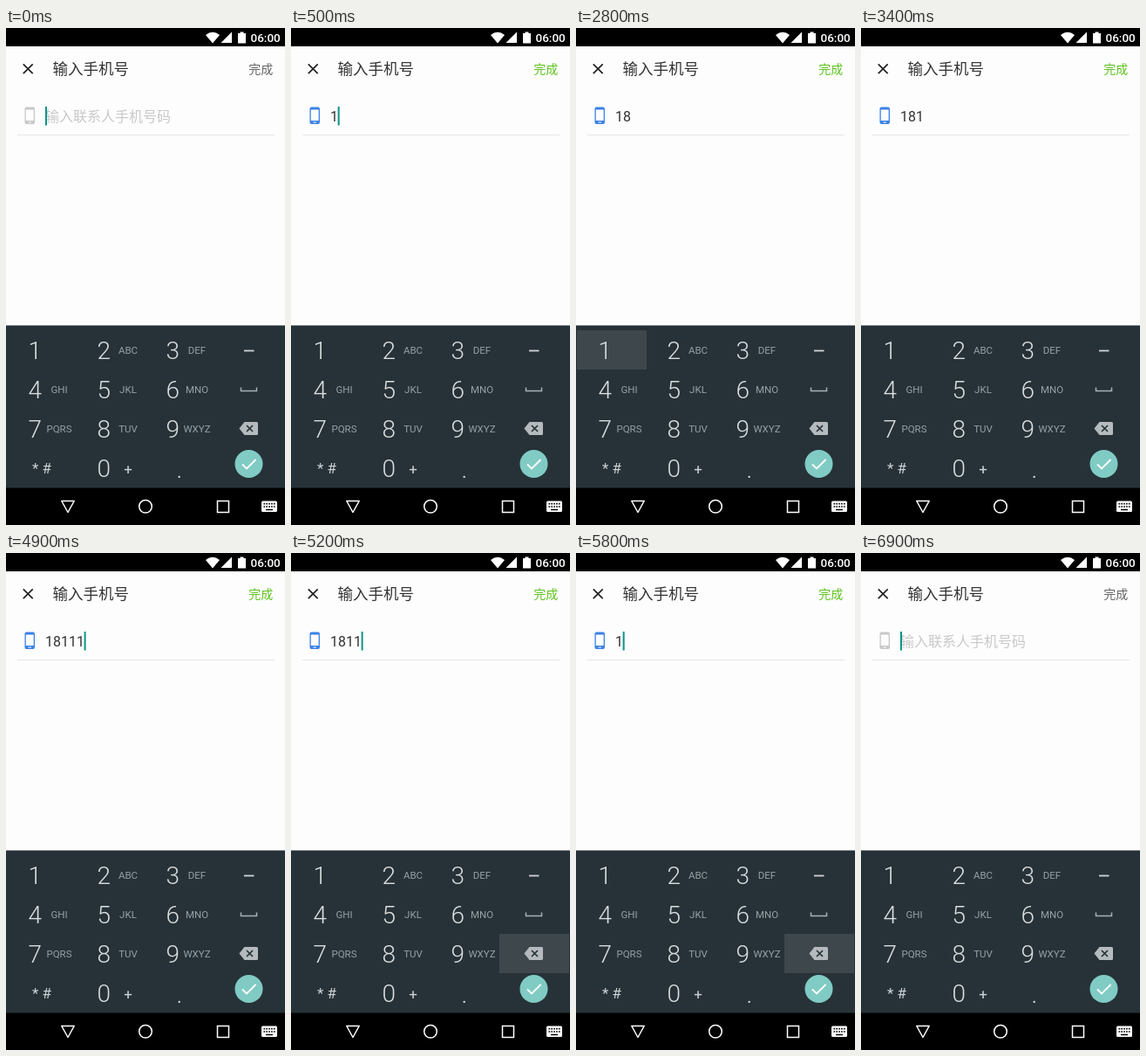
These frames come from a looping animation (320x569 px, 7 s). An HTML page:

```html
<!DOCTYPE html>
<html lang="zh-CN">
<head>
<meta charset="utf-8">
<title>输入手机号</title>
<style>
html, body { margin: 0; width: 100%; height: 100%; overflow: hidden; }
svg { display: block; width: 100vw; height: 100vh; }
text { font-family: "Noto Sans CJK SC", "Noto Sans CJK", sans-serif; white-space: pre; }
.latin { font-family: Roboto, sans-serif; }
.digit { font: 300 28px Roboto, sans-serif; fill: #dadedf; }
.letters { font: 400 11.5px Roboto, sans-serif; fill: #98a0a4; text-anchor: middle; }
.symbol { font: 400 17px Roboto, sans-serif; fill: #cfd4d6; }
.line { fill: none; stroke: #fff; stroke-width: 1.5; }
</style>
</head>
<body>
<svg viewBox="0 0 320 569">
  <rect width="320" height="569"/>
  <rect y="21" width="320" height="320" fill="#fdfdfe"/>
  <rect y="340.5" width="320" height="186" fill="#263238"/>

  <!-- status bar -->
  <g fill="#fff">
    <path d="M229 8Q237 1.500 245 8L237 17.500Z"/>
    <path d="M259 4.500V17H246.500Z"/>
    <path d="M266 6H268.500V4.500H272.500V6H275V17.500H266Z"/>
    <text class="latin" x="280.500" y="16" font-size="13.500" font-weight="500">06:00</text>
  </g>

  <!-- form -->
  <path d="M19.800 41.300L30.700 52.200M30.700 41.300L19.800 52.200" stroke="#222" stroke-width="1.700"/>
  <text x="53.500" y="52.600" font-size="17.500" fill="#333">输入手机号</text>
  <text id="done" x="278.300" y="51.500" font-size="14">完成</text>
  <g id="phone">
    <rect x="21.500" y="90.500" width="11.500" height="19.500" rx="2"/>
    <rect x="22.800" y="93.500" width="8.900" height="12.500" fill="#fdfdfe"/>
    <rect x="25.500" y="107.500" width="3.500" height="1" fill="#fdfdfe"/>
  </g>
  <text id="hint" x="45" y="106.900" font-size="16" fill="#c9c9c9">输入联系人手机号码</text>
  <text id="number" class="latin" x="45" y="107" font-size="16" fill="#333"></text>
  <rect id="cursor" y="90" width="2" height="21.500" fill="#0b9488"/>
  <path d="M13 122.500H308" stroke="#e6e6e6"/>

  <!-- keypad -->
  <rect id="press" width="80" height="45" fill="#3d474c"/>
  <g id="keys"></g>
  <text class="symbol" x="30" y="510">* #</text>
  <text class="symbol" x="140" y="510.500" text-anchor="middle">+</text>
  <text class="digit" x="195.500" y="514.500">.</text>
  <path d="M273 369.500H284.500" stroke="#cfd4d6" stroke-width="1.800"/>
  <path d="M269.500 411.500V415.500H287.500V411.500" fill="none" stroke="#a9b0b3" stroke-width="1.500"/>
  <path d="M267.500 458.500L273.500 451H287.500Q289 451 289 452.500V464.500Q289 466 287.500 466H273.500Z" fill="#b4babd"/>
  <path d="M276 455L283 462M283 455L276 462" stroke="#263238" stroke-width="1.700"/>
  <circle cx="278.500" cy="499" r="16" fill="#80cbc4"/>
  <path d="M271 499.500L276 504.500L286.500 494" fill="none" stroke="#fff" stroke-width="1.900"/>

  <!-- navigation bar -->
  <path class="line" d="M63.800 541.500H78.200L71 554.500Z" stroke-linejoin="round"/>
  <circle class="line" cx="160" cy="547.800" r="7.300"/>
  <rect class="line" x="242.500" y="541.500" width="13" height="13"/>
  <rect x="293" y="541.500" width="18" height="12.500" rx="1.500" fill="#fff"/>
  <path d="M295.500 544.800H309M295.500 548H309" stroke="#000" stroke-width="1.600" stroke-dasharray="1.700 1.150"/>
  <path d="M298 551.500H306" stroke="#000" stroke-width="1.500"/>
</svg>
<script>
const LOOP = 7000, BLINK = 500, DIGIT_WIDTH = 8.98;
const KEY_ONE = [1, 346], KEY_DELETE = [239, 436];

// [start time, entered text, pressed key]
const STATES = [
  [0, ""], [400, "", KEY_ONE], [500, "1"], [2200, "18"],
  [2800, "18", KEY_ONE], [2900, "181"], [3500, "1811"], [3700, "18111"],
  [5100, "18111", KEY_DELETE], [5200, "1811", KEY_DELETE], [5300, "181"],
  [5500, "181", KEY_DELETE], [5600, "18", KEY_DELETE], [5700, "18"],
  [5800, "1", KEY_DELETE], [5900, ""]
];
// Each edit restarts the cursor blink; the first one carries over the loop seam.
const BLINK_STARTS = [-1100, 500, 2200, 2900, 3500, 3900, 5200, 5300, 5600, 5800, 5900];

const $ = id => document.getElementById(id);
const show = (id, visible) => $(id).setAttribute("visibility", visible ? "visible" : "hidden");

const LETTERS = ["", "ABC", "DEF", "GHI", "JKL", "MNO", "PQRS", "TUV", "WXYZ"];
const keyMarkup = (digit, letters, column, row) => {
  const x = 25.5 + 79 * column, y = 379 + 45 * row;
  return `<text class="digit" x="${x}" y="${y}">${digit}</text>
    <text class="letters" x="${x + 35.5}" y="${y - 6}">${letters}</text>`;
};
$("keys").innerHTML = LETTERS.map((letters, i) =>
  keyMarkup(i + 1, letters, i % 3, Math.floor(i / 3))).join("") + keyMarkup(0, "", 1, 3);

function render(t) {
  const [, text, key] = STATES.findLast(([start]) => start <= t);
  const blinkStart = BLINK_STARTS.findLast(start => start <= t);
  const filled = text !== "";

  $("number").textContent = text;
  $("done").setAttribute("fill", filled ? "#5fc320" : "#666");
  $("phone").setAttribute("fill", filled ? "#3b82e6" : "#c8c8c8");
  show("hint", !filled);

  $("cursor").setAttribute("x", 45 + DIGIT_WIDTH * text.length - (filled ? 0.3 : 0));
  show("cursor", Math.floor((t - blinkStart) / BLINK) % 2 === 0);

  show("press", key);
  if (key) {
    $("press").setAttribute("x", key[0]);
    $("press").setAttribute("y", key[1]);
  }
}

function tick() {
  render(performance.now() % LOOP);
  requestAnimationFrame(tick);
}
tick();
</script>
</body>
</html>
```
